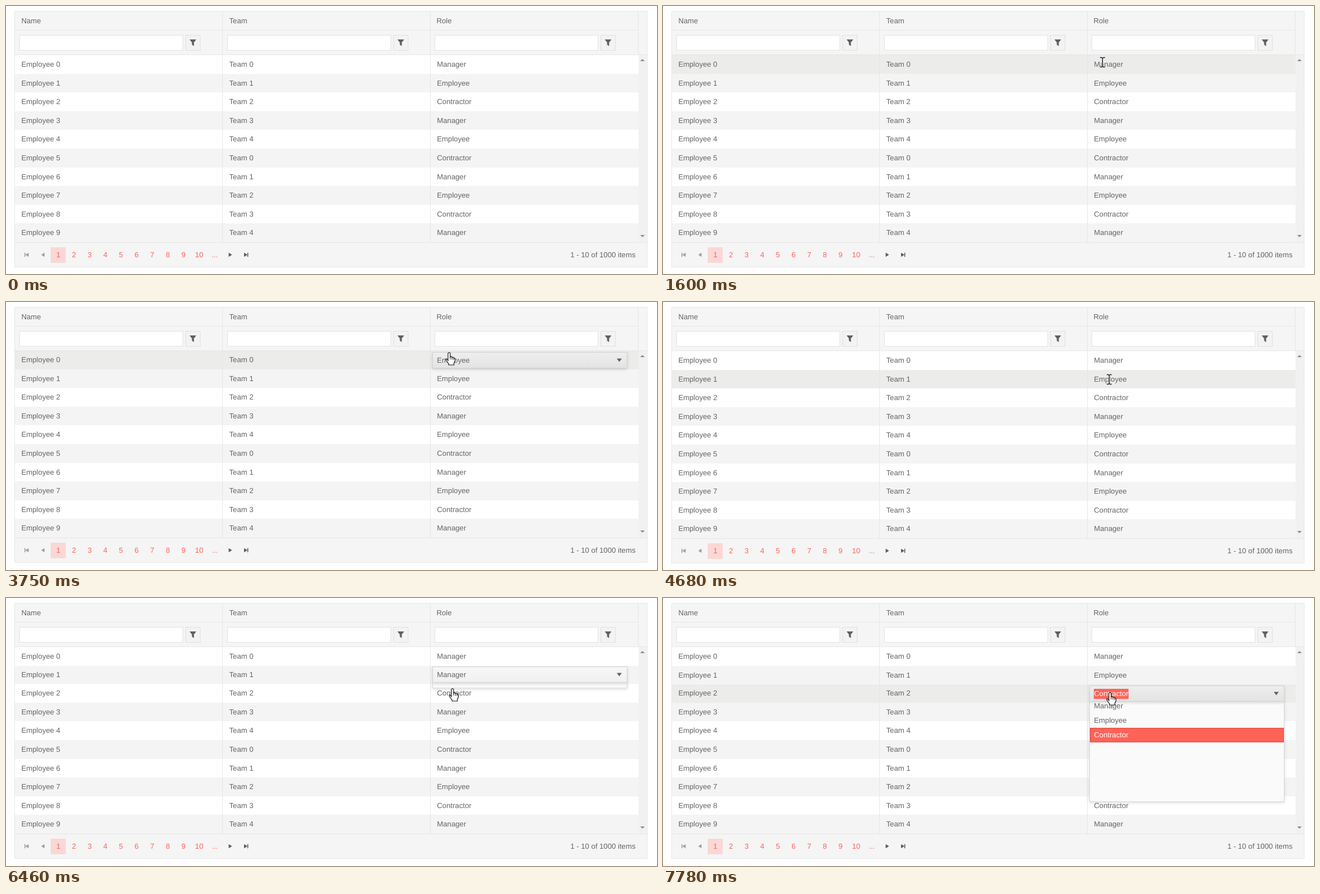
An HTML page with a canvas that plays this animation: 1165 by 481 pixels, repeating every 8000 ms.

```html
<!DOCTYPE html>
<html lang="en">
<head>
<meta charset="utf-8">
<title>Employee grid</title>
<style>
html, body { margin: 0; width: 100%; height: 100%; overflow: hidden; background: #fff; }
canvas { display: block; }
</style>
</head>
<body>
<canvas id="stage" width="1165" height="481"></canvas>
<script>
const ctx = document.getElementById('stage').getContext('2d');
const LOOP = 8000, STEP = 78, LIST_H = 186;
const INK = '#656565', RED = '#ff6358', LINE = '#e6e6e6', PANEL = '#f5f5f5';
const ROLES = ['Manager', 'Employee', 'Contractor'];
const COLS = [16, 388, 760];

// Edit sessions: row, start, end, time of the pick and the picked item.
const EDITS = [
  { row: 0, on: 1660, off: 4600, pick: 3360, item: 1 },
  { row: 1, on: 4750, off: 7170, pick: 6210, item: 0 },
  { row: 2, on: 7330, off: LOOP, pick: LOOP, item: 2 }
];

// Pointer moves: first step, last step, step count, end x, end y.
const MOVES = [
  [420, 420, 1, 1139, 438],
  [497, 880, 6, 795, 106],
  [1180, 1340, 3, 787, 101],
  [2810, 2810, 1, 787, 110],
  [2890, 3130, 4, 793, 162],
  [3440, 3750, 5, 793, 91],
  [4210, 4370, 3, 800, 143],
  [4600, 4750, 3, 799, 137],
  [5520, 5830, 5, 793, 153],
  [6060, 6060, 1, 800, 153],
  [6290, 6460, 3, 799, 163],
  [6920, 7000, 2, 800, 170]
];
const BEAM_TIMES = [[800, 1660], [4290, 4750], [6920, 7330]];

const HAND = new Path2D('M-2 14V1Q0-1.6 2 1V7.5Q4 5.8 5.3 8.5Q7.4 7 8.3 9.6Q10.6 8.8 10.6 11.5V15L8.6 19V22H-.8V20L-5.6 13.5Q-6.6 10-4 11.3Z');
const KNUCKLES = new Path2D('M2 7V12M5.2 8.5V12.5M8.2 10V13');
const ARROW = new Path2D('M0 0V16L3.8 12.6L6.4 18.6L9 17.4L6.4 11.6H11.6Z');
const BEAM = new Path2D('M-4.5-8.5H-1.5L0-7.5L1.5-8.5H4.5M0-7.5V7.5M-4.5 8.5H-1.5L0 7.5L1.5 8.5H4.5');
const FUNNEL = new Path2D('M-6-6H6L1.8-.5V6L-1.8 3.6V-.5Z');

const clamp = v => Math.min(1, Math.max(0, v));

function box(x, y, w, h, color) {
  ctx.fillStyle = color;
  ctx.fillRect(x, y, w, h);
}

function frame(x, y, w, h, color) {
  ctx.strokeStyle = color;
  ctx.lineWidth = 1;
  ctx.strokeRect(x + .5, y + .5, w - 1, h - 1);
}

function label(s, x, y, color = INK, align = 'left') {
  ctx.fillStyle = color;
  ctx.textAlign = align;
  ctx.fillText(s, x, y);
}

function poly(color, ...p) {
  ctx.fillStyle = color;
  ctx.beginPath();
  for (let i = 0; i < p.length; i += 2) ctx.lineTo(p[i], p[i + 1]);
  ctx.fill();
}

function pointerAt(t) {
  let x = null, y = null;
  for (const [from, to, n, ex, ey] of MOVES) {
    if (t < from) break;
    const gap = n > 1 ? (to - from) / (n - 1) : 1;
    const f = Math.min(n, Math.floor((t - from) / gap + .01) + 1) / n;
    x = x === null ? ex : x + (ex - x) * f;
    y = y === null ? ey : y + (ey - y) * f;
  }
  return x === null ? null : { x, y };
}

function listHeight(e, t) {
  const snap = from => Math.floor((t - from) / STEP + .06) * STEP;
  if (t < e.pick) {
    const p = clamp((snap(e.on) - STEP) / 380);
    return LIST_H * (1 - (1 - p) ** 2);
  }
  const p = clamp((snap(e.pick) - STEP) / 230);
  return LIST_H * (1 - p) ** 2.6;
}

const rowTop = (i, edit) => Math.round(88 + 33.6 * i) - (edit && i > edit.row ? 1 : 0);

function drawHeader() {
  box(16, 10, 1132, 78, PANEL);
  ['Name', 'Team', 'Role'].forEach((s, i) => {
    const x = COLS[i];
    label(s, x + 11.5 - (i === 2 ? 1 : 0), 31);
    const left = [24, 396, 767][i];
    box(left, 52, 293, 28, '#fff');
    frame(left, 52, 293, 28, '#e2e2e2');
    box(left + 297, 52, 27, 28, '#f3f3f3');
    frame(left + 297, 52, 27, 28, '#e0e0e0');
    ctx.save();
    ctx.translate(left + 310.5, 66);
    ctx.fillStyle = '#606060';
    ctx.fill(FUNNEL);
    ctx.restore();
  });
  for (const x of [387, 759, 1131]) box(x, 10, 1, 78, LINE);
  box(16, 43, 1116, 1, LINE);
  box(16, 87, 1132, 1, LINE);
}

function drawRows(edit, hover) {
  for (let i = 0; i < 10; i++) {
    const top = rowTop(i, edit);
    const fill = i === hover ? '#ececeb' : i % 2 ? '#f4f4f4' : '#fff';
    box(16, top, 1116, rowTop(i + 1, edit) - top, fill);
    const y = Math.round(109 + 33.6 * i) - (edit && i >= edit.row ? 1 : 0);
    label('Employee ' + i, 27.5, y);
    label('Team ' + i % 5, 399.5, y);
    if (!edit || i !== edit.row) label(ROLES[i % 3], 771.3, y);
  }
  const h = rowTop(10, edit) - 88;
  box(387, 88, 1, h, LINE);
  box(759, 88, 1, h, LINE);
  box(1132, 88, 15, h, '#f1f1f1');
  poly('#8b8b8b', 1135, 99, 1139, 95, 1143, 99);
  const y = h + 77;
  poly('#8b8b8b', 1135, y + 1 - 3, 1143, y + 1 - 3, 1139, y + 2);
}

function drawPager(edit) {
  const top = rowTop(10, edit), mid = top + 22.5;
  box(16, top, 1132, 45, PANEL);
  box(16, top, 1132, 1, LINE);
  const icon = (x, dir, bar, color) => {
    poly(color, x + 3 * dir, mid, x - 3 * dir, mid - 3.7, x - 3 * dir, mid + 3.7);
    if (bar) box(x + 3.7 * dir - .8, mid - 3.7, 1.6, 7.4, color);
  };
  icon(37.5, -1, true, '#a0a0a0');
  icon(66, -1, false, '#a0a0a0');
  icon(401.5, 1, false, '#5c5c5c');
  icon(429, 1, true, '#5c5c5c');
  box(80, top + 9, 27, 28, '#fad8d5');
  for (let i = 1; i <= 11; i++) label(i > 10 ? '...' : i, 66 + 28 * i - .3, top + 27, RED, 'center');
  label('1 - 10 of 1000 items', 1126.5, top + 27, INK, 'right');
  frame(15, 9, 1133, top + 36, LINE);
}

function shadow(on) {
  ctx.shadowColor = on ? 'rgba(0,0,0,.14)' : 'transparent';
  ctx.shadowBlur = on ? 5 : 0;
  ctx.shadowOffsetY = on ? 2 : 0;
}

function drawEditor(edit, t, mouse) {
  const top = Math.floor(91 + 33.5 * edit.row), listTop = top + 28;
  const h = listHeight(edit, t), picked = t >= edit.pick;
  const chosen = picked ? edit.item : edit.row % 3;
  if (h > 0) {
    shadow(true);
    box(763, listTop, 349, h, '#fafafa');
    shadow(false);
    ctx.save();
    ctx.beginPath();
    ctx.rect(763, listTop, 349, h);
    ctx.clip();
    ctx.translate(0, h - LIST_H);
    box(763, listTop, 349, LIST_H, '#fafafa');
    const over = h === LIST_H ? Math.floor((mouse.y - top - 29) / 26) : -1;
    ROLES.forEach((s, i) => {
      const y = top + 29 + 26 * i;
      if (i === chosen) {
        box(764, y, 347, 26, RED);
        frame(764, y, 347, 26, '#d9493f');
      } else if (i === over) box(764, y, 347, 26, '#ededed');
      label(s, 771.3, y + 17, i === chosen ? '#fff' : INK);
    });
    frame(763, listTop, 349, LIST_H, '#d8d8d8');
    ctx.restore();
  }
  const hot = mouse.y < listTop + 1;
  const shade = ctx.createLinearGradient(0, top, 0, top + 28);
  shade.addColorStop(0, hot ? '#eeeeee' : '#f7f7f7');
  shade.addColorStop(1, hot ? '#e3e3e3' : '#f0f0f0');
  shadow(true);
  box(763, top - 1, 349, 29, shade);
  shadow(false);
  frame(763, top - 1, 349, 29, '#d3d3d3');
  const text = ROLES[chosen];
  if (!picked) box(771, top + 5, ctx.measureText(text).width + .5, 18, RED);
  label(text, 771.3, top + 18, picked ? INK : '#fff');
  poly('#606060', 1093, top + 10.5, 1102, top + 10.5, 1097.5, top + 16.5);
}

function drawPointer(mouse, t) {
  ctx.save();
  ctx.translate(Math.round(mouse.x), Math.round(mouse.y));
  ctx.lineWidth = 1.2;
  ctx.strokeStyle = '#111';
  ctx.fillStyle = '#fff';
  if (BEAM_TIMES.some(([a, b]) => t >= a && t < b)) {
    ctx.translate(-.5, 0);
    ctx.strokeStyle = '#fff';
    ctx.lineWidth = 3;
    ctx.stroke(BEAM);
    ctx.strokeStyle = '#111';
    ctx.lineWidth = 1.5;
    ctx.stroke(BEAM);
  } else if (t < 800) {
    ctx.fill(ARROW);
    ctx.stroke(ARROW);
  } else {
    ctx.fill(HAND);
    ctx.stroke(HAND);
    ctx.lineWidth = 1;
    ctx.stroke(KNUCKLES);
  }
  ctx.restore();
}

function hoverRow(mouse, edit, t) {
  if (!mouse || mouse.x > 1131 || mouse.y < 88 || mouse.y >= 424) return -1;
  const row = Math.floor((mouse.y - 88) / 33.6);
  const covered = edit && listHeight(edit, t) > 0 && mouse.y > 119 + 33.5 * edit.row;
  return covered ? -1 : row;
}

function draw(now) {
  const t = now % LOOP;
  const mouse = pointerAt(t);
  const edit = EDITS.find(e => t >= e.on && t < e.off);
  ctx.font = '13.2px "Liberation Sans", Arial, sans-serif';
  ctx.textRendering = 'geometricPrecision';
  box(0, 0, 1165, 481, '#fff');
  drawHeader();
  drawRows(edit, hoverRow(mouse, edit, t));
  drawPager(edit);
  if (edit) drawEditor(edit, t, mouse);
  if (mouse) drawPointer(mouse, t);
}

const start = performance.now();
(function tick() {
  draw(performance.now() - start);
  requestAnimationFrame(tick);
})();
</script>
</body>
</html>
```
